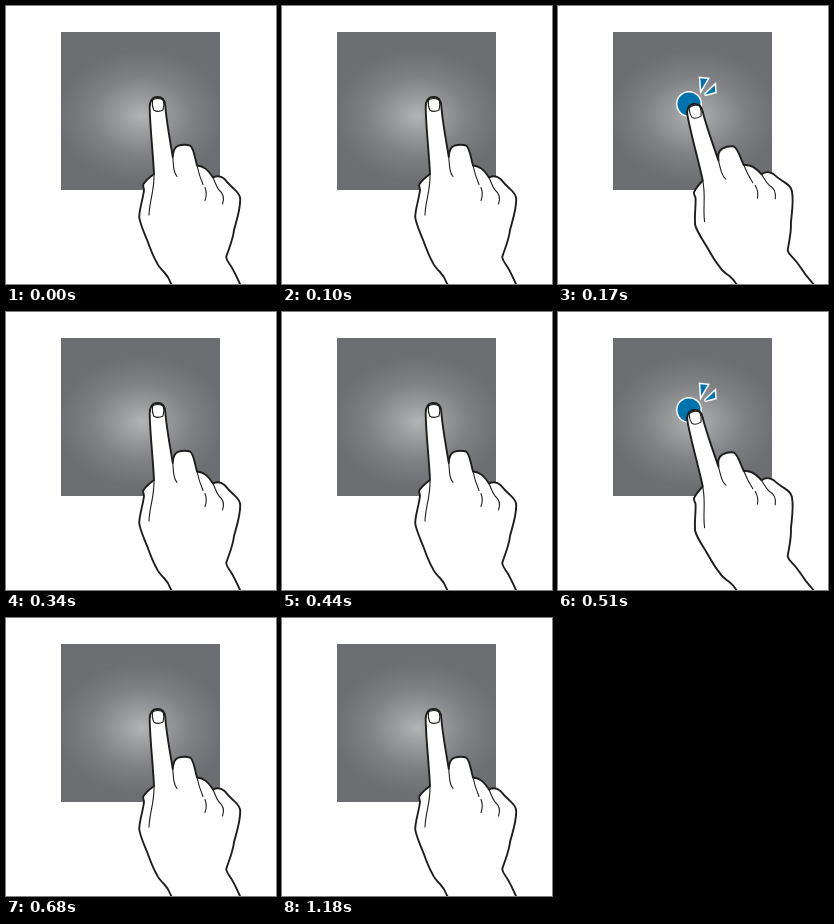
An HTML page that plays this animation: 270 by 278 pixels, repeating every 1.51 s.

```html
<!DOCTYPE html>
<html lang="en">
<head>
<meta charset="utf-8">
<title>Double tap</title>
<style>
  html, body { margin: 0; width: 100%; height: 100%; overflow: hidden; background: #fff; }
  svg { display: block; width: 100%; height: 100%; }
  .skin { fill: #fff; stroke: #1d1d1b; stroke-width: 1.9; stroke-linejoin: round; }
  .crease { fill: none; stroke: #1d1d1b; stroke-width: 1.1; stroke-linecap: round; }
  .mark { fill: #0073ae; stroke: #fff; stroke-width: 3; paint-order: stroke; }
  #down { opacity: 0; }
</style>
</head>
<body>
<svg viewBox="0 0 270 278">
  <defs>
    <radialGradient id="glow" gradientUnits="userSpaceOnUse" cx="0" cy="0" r="1"
      gradientTransform="translate(136 110) scale(84 66)">
      <stop offset="0" stop-color="#b3b4b6"/>
      <stop offset=".25" stop-color="#9b9c9e"/>
      <stop offset=".6" stop-color="#7f8083"/>
      <stop offset="1" stop-color="#6d6e71"/>
    </radialGradient>
    <g id="hand">
      <path class="skin" d="M172 290 L165 277.500 C163 272 161 269 158 266 C155 263 152 260 150.500 256
        C147 250 144 242 141.500 235 C138 226 134 218 133.200 211 C133.500 202 137 193 138 184
        C138 182 136.500 180 137.500 178 C140 174 144 171 148 168
        C147 146 144 122 143.700 102 C143.400 95 146.500 91 151.500 91 C156.500 91 159 94 159.300 100
        C160.500 116 164 134 166.800 151 C167 145 169 141 172.500 139.700 C176 138.600 181 138.600 184 139.500
        C188 142 188.500 151 191 159.500 C198 160 202 164 207 171.500
        C211 169.500 215 170 218.500 173 C221 176 223 178.500 226 181 C230 185 234 187 234.200 193
        C234.500 204 230 216 228 224 C227 234 223 242 220.200 251
        C220.500 254 222 256 223.500 258 C228 264 231 272 234 278 L241 290"/>
      <path class="crease" d="M146.500 94.500 C148 91.800 155.500 91.800 157.300 94.500 C158.300 98 158 101 157 104
        C154 105.600 150 105.600 147.700 104 C146.200 101 146 98 146.500 94.500Z"/>
      <path class="crease" d="M166.800 151 C167.500 162 168 167 171 170.500 M148 168 C148.500 185 143.500 194 143 209
        M191 159.500 Q193 169 197 178.500 M199 181.500 Q201.500 188 199 194.500
        M207 171.500 C209 176 210 180 213 184 C217 187 218.500 192 216.500 198"/>
    </g>
  </defs>

  <rect x="55" y="26" width="159" height="158" fill="url(#glow)"/>

  <use id="up" href="#hand"/>

  <g id="down">
    <circle class="mark" cx="131" cy="98" r="11.500"/>
    <path class="mark" d="M142.300 72.200 L149.500 73 L143.200 83.800Z M156.800 79.300 L157.200 86 L146.800 88.800Z"/>
    <use href="#hand" transform="translate(-16 7) rotate(-9.500 151.500 91)"/>
  </g>
</svg>
<script>
  const LOOP = 1510;
  const STEPS = [[0, 0], [170, 1], [340, 0], [510, 1], [680, 0], [LOOP, 0]];

  function toggle(id, shownWhen) {
    const frames = STEPS.map(([ms, pressed]) => ({
      offset: ms / LOOP,
      opacity: pressed === shownWhen ? 1 : 0,
      easing: "steps(1, end)"
    }));
    document.getElementById(id).animate(frames, { duration: LOOP, iterations: Infinity });
  }

  toggle("up", 0);
  toggle("down", 1);
</script>
</body>
</html>
```
